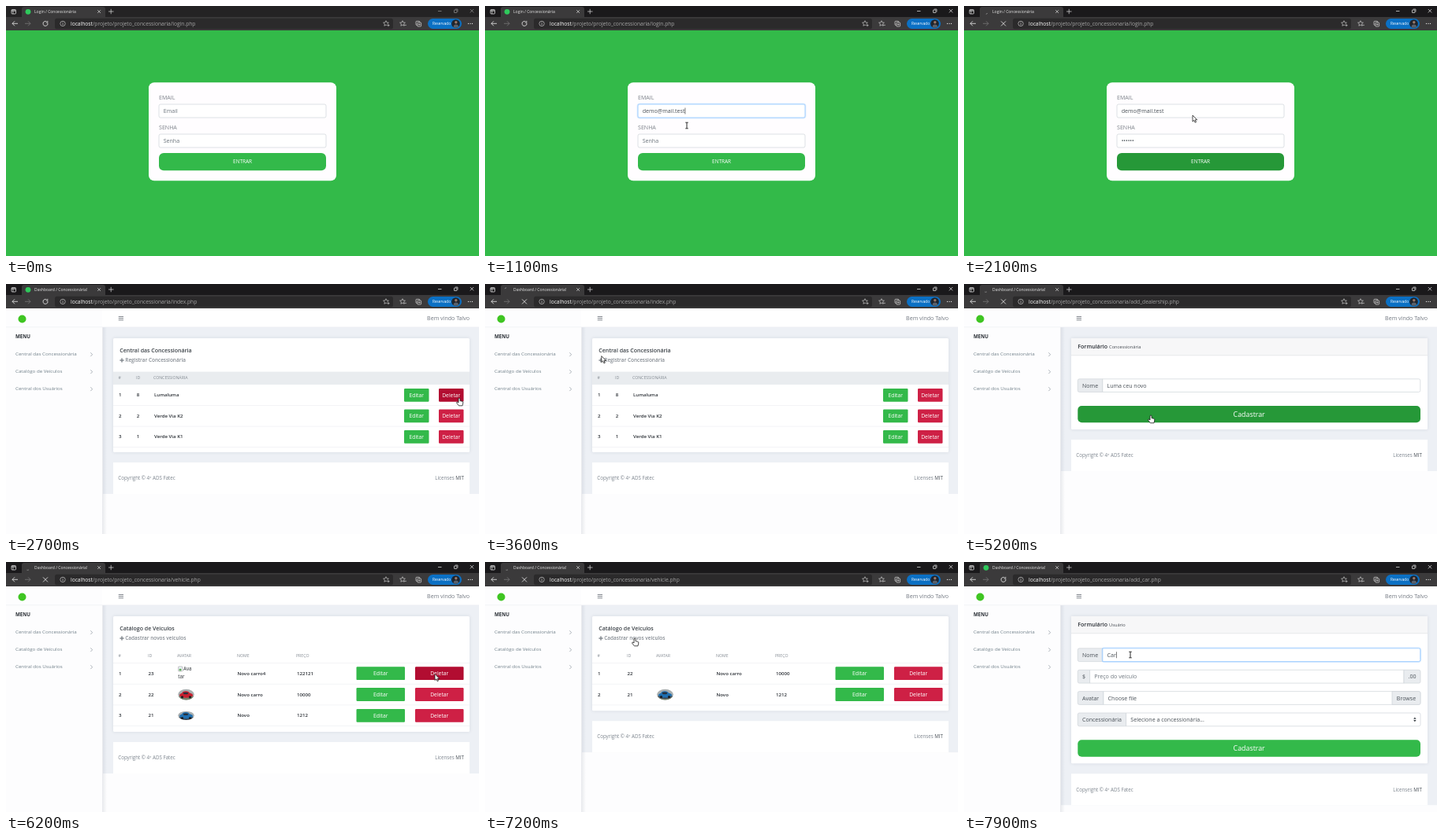
These frames come from a looping animation (600x318 px, 8000 ms). An HTML page with a canvas:

```html
<!DOCTYPE html>
<html lang="pt">
<head>
<meta charset="utf-8">
<title>Dashboard</title>
<style>
html, body { margin: 0; width: 100%; height: 100%; overflow: hidden; background: #fff; }
canvas { display: block; width: 600px; height: 318px; }
</style>
</head>
<body>
<canvas id="stage"></canvas>
<script>
const W = 600, H = 318, LOOP = 8000, STEP = 100;
const canvas = document.getElementById('stage');
const ratio = window.devicePixelRatio || 1;
canvas.width = W * ratio;
canvas.height = H * ratio;
const c = canvas.getContext('2d');
c.scale(ratio, ratio);

const GREEN = '#33b94a', GREEN_DARK = '#269838', RED = '#ce2045', RED_DARK = '#b20d31';
const INK = '#2b3036', GRAY = '#6c757d', LINE = '#ced4da', FILL = '#e9ecef';

// time, x, y, shape of the pointer
const PATH = [
  [100, 330, 210, 'arrow'], [300, 262, 133, 'beam'], [1000, 262, 133, 'beam'],
  [1200, 250, 171, 'beam'], [1600, 250, 171, 'arrow'], [1800, 298, 198, 'hand'],
  [1950, 298, 198, 'arrow'], [2100, 290, 139, 'arrow'], [2650, 575, 145, 'hand'],
  [2850, 575, 145, 'arrow'], [3000, 540, 186, 'arrow'], [3300, 60, 89, 'hand'],
  [3450, 60, 89, 'arrow'], [3700, 195.5, 93, 'hand'], [4200, 195.5, 93, 'arrow'],
  [4400, 250, 129, 'beam'], [4950, 250, 129, 'arrow'], [5100, 237, 167, 'hand'],
  [5350, 237, 167, 'arrow'], [5600, 42, 111, 'hand'], [5750, 42, 111, 'arrow'],
  [6050, 544, 142.5, 'arrow'], [6350, 544, 142.5, 'arrow'], [6900, 190, 97, 'hand'],
  [7250, 190, 97, 'arrow'], [7500, 211, 118, 'beam']
];
const LOADS = [[1900, 2300], [2800, 3700], [3900, 4000], [5100, 5400], [5700, 5800], [6200, 6400], [7200, 7300]];
const OLD = [['2', 'Verde Via K2'], ['1', 'Verde Via K1']];
const CARS = [['23', 'Novo carro4', '122121'], ['22', 'Novo carro', '10000'], ['21', 'Novo', '1212']];
const EMAIL = 'demo@mail.test', DEALER = 'Luma ceu novo';

let now = 0, loading = false, ptr = null;

function txt(s, x, y, size, color, weight = 400, align = 'left') {
  c.font = `${weight} ${size}px "Open Sans", "Noto Sans", sans-serif`;
  c.textAlign = align;
  c.fillStyle = color;
  c.fillText(s, x, y + size * 0.36);
  return c.measureText(s).width;
}
function rect(x, y, w, h, color) {
  c.fillStyle = color;
  c.fillRect(x, y, w, h);
}
function box(x, y, w, h, r, fill, stroke) {
  c.beginPath();
  c.roundRect(x, y, w, h, r);
  if (fill) { c.fillStyle = fill; c.fill(); }
  if (stroke) { c.strokeStyle = stroke; c.lineWidth = 0.7; c.stroke(); }
}
function disc(x, y, rx, color, ry = rx) {
  c.beginPath();
  c.ellipse(x, y, rx, ry, 0, 0, 7);
  c.fillStyle = color;
  c.fill();
}
function line(points, color, width = 0.8) {
  c.beginPath();
  points.forEach(([x, y], i) => i ? c.lineTo(x, y) : c.moveTo(x, y));
  c.strokeStyle = color;
  c.lineWidth = width;
  c.stroke();
}
function shadowed(blur, color, draw) {
  c.save();
  c.shadowBlur = blur * ratio;
  c.shadowColor = color;
  draw();
  c.restore();
}
const over = (x, y, w, h) => ptr && ptr.x >= x && ptr.x <= x + w && ptr.y >= y && ptr.y <= y + h;
const between = (a, b) => now >= a && now < b;
const typed = (s, a, b) => s.slice(0, Math.round(s.length * Math.min(1, Math.max(0, (now - a) / (b - a)))));

function pointerAt(t) {
  if (t < PATH[0][0]) return null;
  let i = PATH.findLastIndex(k => k[0] <= t);
  const a = PATH[i], b = PATH[i + 1] || a;
  let u = b === a ? 0 : (t - a[0]) / (b[0] - a[0]);
  u = u * u * (3 - 2 * u);
  return { x: a[1] + (b[1] - a[1]) * u, y: a[2] + (b[2] - a[2]) * u, kind: a[3] };
}

function button(label, x, y, w, h, r, size, colors, force) {
  box(x, y, w, h, r, colors[force || over(x, y, w, h) ? 1 : 0]);
  txt(label, x + w / 2, y + h / 2, size, '#fff', 400, 'center');
}
function field(x, y, w, h, text, hint, focus, radius = 2) {
  if (focus) box(x - 0.8, y - 0.8, w + 1.6, h + 1.6, 2.5, null, '#bfdeff');
  box(x, y, w, h, radius, '#fff', focus ? '#80bdff' : LINE);
  const used = txt(text || hint, x + 5.7, y + h / 2, 7.07, text ? '#495057' : GRAY);
  if (focus) rect(x + 5.9 + (text ? used : 0), y + h / 2 - 4, 0.6, 8, '#222');
}
function addon(label, x, y, w, h, radius) {
  box(x, y, w, h, radius, FILL, LINE);
  txt(label, x + w / 2, y + h / 2, 7.07, '#495057', 400, 'center');
}

function chrome(title, file) {
  const live = now >= 100, soft = live ? '#eee' : '#999';
  rect(0, 0, W, 14, live ? '#1a191b' : '#242324');
  box(20, 1, 106, 14, [3, 3, 0, 0], '#3b3a3b');
  rect(0, 14, W, 17, '#3b3a3b');

  box(7, 4.5, 5.5, 5.5, 1, null, '#eee');
  line([[7, 6], [12, 6]], '#eee', 1);
  line([[9, 6], [9, 10]], '#eee', 0.6);
  if (loading) {
    const a = now / 160;
    c.beginPath();
    c.arc(27.5, 7.5, 2.8, a, a + 0.9);
    c.strokeStyle = '#999';
    c.lineWidth = 0.8;
    c.stroke();
  } else disc(28, 7.3, 3.4, '#2fc95c');
  txt(title, 36, 7.2, 5.03, '#e8e8e8');
  line([[116.2, 5.2], [120, 9]], '#ddd', 0.7);
  line([[120, 5.2], [116.2, 9]], '#ddd', 0.7);
  line([[130, 7], [136.5, 7]], '#ddd', 0.7);
  line([[133.2, 3.8], [133.2, 10.2]], '#ddd', 0.7);

  line([[548, 6.5], [552.5, 6.5]], soft, 0.7);
  box(568.5, 5, 3.5, 3.5, 0.4, null, soft);
  line([[569.7, 4], [573, 4], [573, 7.5]], soft, 0.6);
  line([[588.8, 4], [593.2, 8.4]], soft, 0.7);
  line([[593.2, 4], [588.8, 8.4]], soft, 0.7);

  line([[11, 19.3], [8, 22.3], [11, 25.3]], '#eee');
  line([[8, 22.3], [15, 22.3]], '#eee');
  line([[28, 19.3], [31, 22.3], [28, 25.3]], '#777');
  line([[24, 22.3], [31, 22.3]], '#777');
  if (loading) {
    line([[47, 19.4], [53, 25.4]], '#eee');
    line([[53, 19.4], [47, 25.4]], '#eee');
  } else {
    c.beginPath();
    c.arc(50, 22.4, 3, -0.3, 5.3);
    c.strokeStyle = '#eee';
    c.lineWidth = 0.8;
    c.stroke();
    line([[52.8, 18.8], [52.8, 21], [50.6, 21]], '#eee', 0.7);
  }

  box(62, 15.7, 429, 13.6, 2.5, '#2b2a2b');
  c.beginPath();
  c.arc(72, 22.4, 3.2, 0, 7);
  c.strokeStyle = '#ddd';
  c.lineWidth = 0.6;
  c.stroke();
  rect(71.7, 21.8, 0.7, 2.4, '#ddd');
  rect(71.7, 20.4, 0.7, 0.8, '#ddd');
  const w = txt('localhost', 82, 22.4, 6.67, '#fff');
  txt('/projeto/projeto_concessionaria/' + file, 82 + w, 22.4, 6.67, '#a5a5a5');
  star(482, 22.3);
  rect(483, 23.2, 4, 3, '#2b2a2b');
  line([[483.4, 24.6], [486.6, 24.6]], '#ddd', 0.6);
  line([[485, 23], [485, 26.2]], '#ddd', 0.6);
  star(503, 22.3);
  line([[505, 24.3], [508, 24.3]], '#ddd', 0.6);
  box(520, 19.3, 4.8, 5, 0.8, null, '#ddd');
  box(521.8, 21, 4.8, 5, 0.8, '#3b3a3b', '#ddd');
  line([[522.8, 23.5], [525.6, 23.5]], '#ddd', 0.6);
  line([[524.2, 22.1], [524.2, 24.9]], '#ddd', 0.6);

  box(535, 16, 43, 13, 6.5, '#0b70c4');
  txt('Reservado', 541, 22.4, 4.7, '#fff');
  disc(570.5, 22.5, 5.3, '#20242c');
  disc(570.8, 20.8, 1.7, '#98796a');
  c.save();
  c.beginPath();
  c.arc(570.5, 22.5, 5.3, 0, 7);
  c.clip();
  disc(570.8, 26.6, 3.2, '#59606b');
  c.restore();
  [586.5, 589, 591.5].forEach(x => disc(x, 22.4, 0.6, '#eee'));
}
function star(x, y) {
  const pts = [];
  for (let i = 0; i <= 10; i++) {
    const a = i * Math.PI / 5 - Math.PI / 2, r = i % 2 ? 1.7 : 3.6;
    pts.push([x + r * Math.cos(a), y + r * Math.sin(a)]);
  }
  line(pts, '#ddd', 0.6);
}

function login() {
  rect(0, 31, W, H - 31, '#33ba49');
  box(181, 97.3, 238, 125, 7, '#fffdff');
  txt('EMAIL', 194, 116, 7.07, '#7d828a');
  field(194, 125, 212, 17, typed(EMAIL, 300, 1000), 'Email', between(300, 1200));
  txt('SENHA', 194, 154, 7.07, '#7d828a');
  field(194, 163, 212, 17, typed('••••••', 1200, 1600), 'Senha', between(1200, 1800));
  button('ENTRAR', 194, 187, 212, 22.3, 6, 6.4, [GREEN, GREEN_DARK], loading);
}

// shared layout: side menu, top bar, white card and footer
function shell(bottom) {
  rect(0, 31, W, H - 31, '#fdfdfe');
  rect(123, 55, W - 123, bottom + 53 - 55, '#edf0f5');
  const g = c.createLinearGradient(122, 0, 128, 0);
  g.addColorStop(0, 'rgba(90,100,120,.13)');
  g.addColorStop(1, 'rgba(90,100,120,0)');
  rect(122, 31, 6, H - 31, g);
  rect(122, 31, W - 122, 24, '#fff');
  rect(0, 54.6, W, 0.6, '#e9ecf0');
  disc(20.5, 44.5, 5, '#3fc522');
  [41, 43.2, 45.4].forEach(y => rect(142.7, y, 6.3, 0.9, '#747a82'));
  txt('Bem vindo Talvo', 588, 43.6, 7.07, '#717780', 400, 'right');
  txt('MENU', 12, 67, 6.2, INK, 700);
  ['Central das Concessionária', 'Catalógo de Veículos', 'Central dos Usuários'].forEach((s, i) => {
    const y = 89 + 22 * i;
    txt(s, 12, y, 6.18, over(8, y - 8, 108, 16) ? INK : '#71808a');
    line([[107.3, y - 1.7], [109.6, y + 0.7], [107.3, y + 3.1]], '#8a939c', 0.7);
  });
  shadowed(4, 'rgba(60,70,100,.14)', () => box(136, 69, 452, bottom - 69, 1.5, '#fff'));
  rect(136, bottom + 13, 452, 40, '#fff');
  const y = bottom + 33;
  txt('Copyright © 4º ADS Fatec', 142.3, y, 6.2, '#7c848d');
  txt('MIT', 581, y, 6.2, '#4c535b', 400, 'right');
  txt('Licenses ', 570.2, y, 6.2, '#7c848d', 400, 'right');
}
function cardHead(title, link) {
  txt(title, 144.3, 84, 7, '#3a4046', 600);
  rect(144.4, 96.3, 5.2, 1.5, '#848a91');
  rect(146.25, 94.4, 1.5, 5.2, '#848a91');
  txt(link, 151.3, 97, 6.43, '#848a91', 600);
}
function heads(list) {
  list.forEach(([s, x]) => txt(s, x, 119.6, 5.2, '#848b93'));
}
function actions(y, x1, x2, w) {
  button('Editar', x1, y - 8.4, w, 16.8, 1.2, 6.75, [GREEN, GREEN_DARK]);
  button('Deletar', x2, y - 8.4, w, 16.8, 1.2, 6.75, [RED, RED_DARK]);
}

function dealers(rows) {
  shell(134.5 + 26.5 * rows.length);
  cardHead('Central das Concessionária', 'Registrar Concessionária');
  rect(136, 111.6, 452, 16.4, FILL);
  heads([['#', 142.5], ['ID', 165], ['CONCESSIONÁRIA', 187]]);
  rows.forEach(([id, name], i) => {
    const y = 141.3 + 26.5 * i;
    rect(136, y + 13, 452, 0.5, '#e6e9ed');
    txt(i + 1, 143, y, 6.1, INK, 600);
    txt(id, 165.8, y, 6.1, INK, 600);
    txt(name, 188, y, 6.1, INK, 600);
    actions(y, 505, 549, 31.5);
  });
}

function thumb(y, ry, body, ground) {
  c.save();
  c.beginPath();
  c.ellipse(228.5, y, 10.2, ry, 0, 0, 7);
  c.clip();
  rect(218, y - 8, 21, 16, '#a9afb0');
  rect(218, y + 2, 21, 7, ground);
  disc(228.5, y + 0.8, 8.5, body, 3.3);
  disc(228, y - 1.8, 4.6, body, 2.5);
  disc(228, y - 1.6, 3.2, '#27303b', 1.3);
  disc(223.5, y + 3.2, 1.6, '#1c1d20');
  disc(233.5, y + 3.2, 1.6, '#1c1d20');
  c.restore();
}
function vehicles(rows) {
  const dy = 26.8;
  shell(135.6 + dy * rows.length);
  cardHead('Catálogo de Veiculos', 'Cadastrar novos veiculos');
  heads([['#', 142.5], ['ID', 180], ['AVATAR', 217], ['NOME', 293], ['PREÇO', 368]]);
  rect(136, 128, 452, 0.5, '#e6e9ed');
  rows.forEach(([id, name, price], i) => {
    const y = 141.7 + dy * i;
    rect(136, y + 13.2, 452, 0.5, '#e6e9ed');
    txt(i + 1, 143, y, 6.1, INK, 600);
    txt(id, 180.6, y, 6.1, INK, 600);
    txt(name, 293.5, y, 6.1, INK, 600);
    txt(price, 369, y, 6.1, INK, 600);
    if (id === '23') {
      box(218.7, 133, 5, 6, 0.3, '#eef4fb', '#aaa');
      disc(221, 137, 1.5, '#5fae57');
      txt('Ava', 225, 136.2, 6.2, INK);
      txt('tar', 218.3, 146, 6.2, INK);
    } else if (id === '22') thumb(168.6, 6.8, '#c8202f', '#77836c');
    else thumb(y, 5.6, '#1e6fb0', '#3c434c');
    actions(y, 444.5, 519, 61.5);
  });
}

function formHead(sub, bottom) {
  shell(bottom);
  rect(136, 69, 452, 21.7, '#f7f7f8');
  rect(136, 90.5, 452, 0.7, '#dfe1e4');
  const w = txt('Formulário', 144.3, 79.8, 7.07, INK, 600);
  txt(sub, 146.3 + w, 80.2, 5.7, '#444a51');
}
const LEFT = [2, 0, 0, 2], RIGHT = [0, 2, 2, 0];

function addDealer() {
  formHead('Concessionária', 185);
  addon('Nome', 144.3, 120.8, 31.5, 16.6, LEFT);
  field(175.8, 120.8, 403, 16.6, typed(DEALER, 4400, 4950), 'Nome da concessionária', between(4400, 5100), RIGHT);
  button('Cadastrar', 144.3, 155, 434.7, 21.3, 5, 8.84, [GREEN, GREEN_DARK]);
}
function addCar() {
  const h = 16.8;
  formHead('Usuário', 256.3);
  addon('Nome', 144.3, 109.8, 31.5, h, LEFT);
  field(175.8, 109.8, 403, h, typed('Car', 7500, 7900), '', now >= 7500, RIGHT);
  addon('$', 144.3, 137.3, 15.3, h, LEFT);
  field(159.6, 137.3, 398.4, h, '', 'Preço do veículo', false, 0);
  addon('.00', 558, 137.3, 21, h, RIGHT);
  addon('Avatar', 144.3, 164.6, 32.6, h, LEFT);
  field(176.9, 164.6, 402, h, 'Choose file', '', false, RIGHT);
  addon('Browse', 543, 164.6, 36, h, RIGHT);
  addon('Concessionária', 144.3, 192, 61.3, h, LEFT);
  field(205.6, 192, 373.4, h, 'Selecione a concessionária...', '', false, RIGHT);
  [-1, 1].forEach(s => {
    c.beginPath();
    c.moveTo(570.2, 200.4 + s * 0.6);
    c.lineTo(573.6, 200.4 + s * 0.6);
    c.lineTo(571.9, 200.4 + s * 2.8);
    c.fillStyle = '#343a40';
    c.fill();
  });
  button('Cadastrar', 144.3, 226.3, 434.7, 21.5, 5, 8.84, [GREEN, GREEN_DARK]);
}

function pointer() {
  if (!ptr) return;
  c.save();
  c.translate(ptr.x, ptr.y);
  c.lineJoin = 'round';
  if (ptr.kind === 'beam') {
    line([[-1.8, -3.8], [1.8, -3.8]], '#111', 0.8);
    line([[-1.8, 3.8], [1.8, 3.8]], '#111', 0.8);
    line([[0, -3.8], [0, 3.8]], '#111', 0.9);
  } else {
    const shape = ptr.kind === 'hand'
      ? 'M-1 .6Q0-.6 1 .6V3.6L4 4.3Q5 4.6 4.8 6L4 9.8H-.6L-3.4 6.2Q-3.4 4.6-2 5.2L-1 6Z'
      : 'M0 0V8L1.8 6.3L3.1 9.2L4.5 8.6L3.2 5.8H5.7Z';
    const p = new Path2D(shape);
    c.fillStyle = '#fff';
    c.fill(p);
    c.strokeStyle = '#111';
    c.lineWidth = 0.75;
    c.stroke(p);
  }
  c.restore();
}

const DASH = 'Dashboard / Concessionária!';
const SCENES = [
  [2300, 'Login / Concessionária', 'login.php', login],
  [3700, DASH, 'index.php', () => dealers([['8', 'Lumaluma'], ...OLD])],
  [4000, DASH, 'index.php', () => dealers(OLD)],
  [5400, DASH, 'add_dealership.php', addDealer],
  [5800, DASH, 'index.php', () => dealers([['9', DEALER], ...OLD])],
  [6400, DASH, 'vehicle.php', () => vehicles(CARS)],
  [7300, DASH, 'vehicle.php', () => vehicles(CARS.slice(1))],
  [LOOP, DASH, 'add_car.php', addCar]
];

function render(t) {
  now = Math.floor(t / STEP) * STEP;
  loading = LOADS.some(([a, b]) => between(a, b));
  ptr = pointerAt(now);
  const [, title, file, page] = SCENES.find(s => now < s[0]);
  c.clearRect(0, 0, W, H);
  page();
  chrome(title, file);
  pointer();
}

let start;
function tick(time) {
  start ??= time;
  render(Math.max(0, time - start) % LOOP);
  requestAnimationFrame(tick);
}
render(0);
requestAnimationFrame(tick);
</script>
</body>
</html>
```
